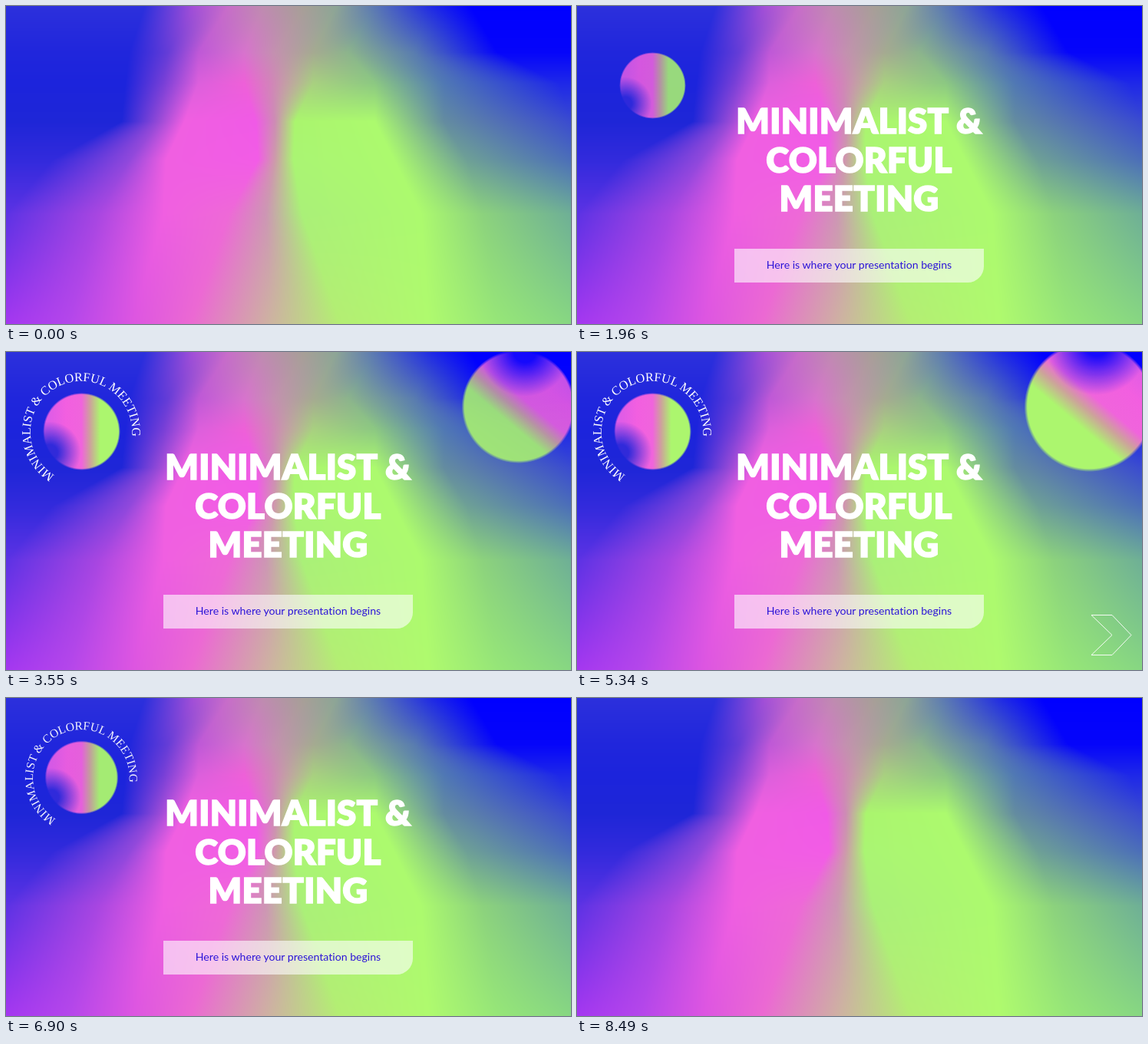
An HTML page with a canvas that plays this animation: 736 by 414 pixels, repeating every 9500 ms.

```html
<!DOCTYPE html>
<html lang="en">
<head>
<meta charset="utf-8">
<title>Minimalist &amp; colorful meeting</title>
<style>
  html, body { margin: 0; width: 100%; height: 100%; overflow: hidden; background: #2026dc; }
  canvas, svg { position: absolute; left: 0; top: 0; width: 736px; height: 414px; }
  text { fill: #fff; }
  #title { font: 900 45.5px Lato, sans-serif; letter-spacing: .3px; text-anchor: middle; stroke: #fff; stroke-width: 1.5px; }
  #subtitle { font: 14.1px Lato, sans-serif; font-variant-ligatures: none; text-anchor: middle; fill: #2c14d8; }
  #ring { font: 16.3px "Liberation Serif", serif; }
</style>
</head>
<body>
<canvas id="backdrop" width="736" height="414"></canvas>
<svg viewBox="0 0 736 414">
  <defs>
    <linearGradient id="dye">
      <stop offset=".1" stop-color="#e05ce6"/>
      <stop offset=".3" stop-color="#f25fe0"/>
      <stop offset=".5" stop-color="#f064dc"/>
      <stop offset=".61" stop-color="#cda29b"/>
      <stop offset=".74" stop-color="#acf66e"/>
    </linearGradient>
    <linearGradient id="dyeShifted" href="#dye" gradientTransform="translate(-.08)"/>
    <radialGradient id="softEdge">
      <stop offset=".95" stop-color="#fff"/>
      <stop offset="1" stop-color="#000"/>
    </radialGradient>
    <radialGradient id="hollow">
      <stop offset=".25" stop-color="#000" stop-opacity=".9"/>
      <stop offset="1" stop-color="#000" stop-opacity="0"/>
    </radialGradient>
    <mask id="orbMask" maskUnits="userSpaceOnUse" x="-1" y="-1" width="2" height="2">
      <circle r="1" fill="url(#softEdge)"/>
      <circle cx="-.82" cy=".54" r=".8" fill="url(#hollow)"/>
    </mask>
    <path id="ringPath"/>
  </defs>

  <g id="title">
    <text x="367.5" y="165.5">MINIMALIST &amp;</text>
    <text x="367.5" y="216.5">COLORFUL</text>
    <text x="367.5" y="266.5">MEETING</text>
  </g>
  <path id="box" d="M205 316H530V339A21 21 0 0 1 509 360H205Z" fill="#fff"/>
  <text id="subtitle" x="367.5" y="342">Here is where your presentation begins</text>

  <g id="smallOrb"><circle r="1" transform="scale(50.5)" fill="url(#dye)" mask="url(#orbMask)"/></g>
  <g id="ring"><text><textPath href="#ringPath">MINIMALIST &amp; COLORFUL MEETING</textPath></text></g>
  <g id="bigOrb"><circle r="1" transform="rotate(130) scale(85)" fill="url(#dyeShifted)" mask="url(#orbMask)"/></g>
  <path id="arrow" d="M670 342.5H697L722 368.5L697 394.5H670L697 368.5Z" fill="none" stroke="#fff"/>
</svg>
<script>
const LOOP = 9500;
const $ = id => document.getElementById(id);
const mix = (a, b, k) => a + (b - a) * k;
const span = (t, from, to) => Math.min(1, Math.max(0, (t - from) / (to - from)));

// Colour mesh: every row has the same number of "x colour" stops.
const mesh = [
  [0, "180 2c30dc,245 a550d7,290 c86ec8,335 be8caf,390 a5a096,430 8ca596,480 5a78b4,555 1e28e6,605 0000ff"],
  [60, "160 2026dc,210 643cd7,250 be58d7,310 d773cd,350 c391af,400 a5aa91,445 8cb48c,530 5a7daf,640 0505fa"],
  [100, "155 1c24dc,205 783fd7,250 dc5fdc,310 ee60d8,345 d284b9,400 a8d080,480 8cc882,570 5078b4,720 1e28e8"],
  [150, "150 1e26d7,200 9b4bd7,232 f05fe1,325 f05ae6,350 cd8cb4,376 aaf56e,480 acfa6e,570 648ca0,736 3a4bd0"],
  [200, "60 322adc,160 9048dc,208 f05fe1,328 f25ce6,350 cd9baa,374 aaf573,505 acfa6e,600 6ea096,736 4b6eb9"],
  [270, "0 5c32e4,120 a846e1,205 f05fe1,290 ee69d7,338 cd96b4,385 aaf078,540 acfa6e,620 8cd27d,736 6eaf96"],
  [414, "0 a537f0,80 b446eb,165 dc55e1,240 eb69d2,345 cdb4a0,435 b4ee73,550 affa6e,640 96e678,736 87d782"]
].map(([y, row]) => ({
  y,
  stops: row.split(",").map(stop => {
    const [x, hex] = stop.split(" ");
    const rgb = parseInt(hex, 16);
    return [+x, rgb >> 16, rgb >> 8 & 255, rgb & 255];
  })
}));

function paintBackdrop() {
  const ctx = $("backdrop").getContext("2d");
  const image = ctx.createImageData(736, 414);
  for (let y = 0, p = 0; y < 414; y++) {
    const r = mesh.findIndex(row => row.y > y);
    const above = mesh[r - 1], below = mesh[r];
    const k = (y - above.y) / (below.y - above.y);
    const stops = above.stops.map((stop, i) => stop.map((v, c) => mix(v, below.stops[i][c], k)));
    for (let x = 0, s = 0; x < 736; x++, p += 4) {
      while (s < stops.length - 2 && x > stops[s + 1][0]) s++;
      const a = stops[s], b = stops[s + 1];
      const m = span(x, a[0], b[0]);
      for (let c = 1; c < 4; c++) image.data[p + c - 1] = mix(a[c], b[c], m);
      image.data[p + 3] = 255;
    }
  }
  ctx.putImageData(image, 0, 0);
}

function layRingPath() {
  const radius = 66.2;
  const point = deg => {
    const a = deg * Math.PI / 180;
    return `${radius * Math.cos(a)} ${radius * Math.sin(a)}`;
  };
  $("ringPath").setAttribute("d",
    `M${point(121.5)}A${radius} ${radius} 0 0 1 ${point(270)}A${radius} ${radius} 0 0 1 ${point(380)}`);
}

const fade = (id, alpha) => $(id).setAttribute("opacity", alpha);

function zoom(id, x, y, scale, alpha = scale) {
  $(id).setAttribute("transform", `translate(${x} ${y}) scale(${Math.max(scale, 0.001)})`);
  fade(id, alpha);
}

function draw(t) {
  const headingOut = 1 - span(t, 7940, 8490);
  const boxIn = span(t, 550, 1100);
  fade("title", span(t, 0, 550) * headingOut);
  fade("box", 0.6 * boxIn * (2 - boxIn) * headingOut);
  fade("subtitle", span(t, 800, 1150) * headingOut);

  const smallOut = 1 - span(t, 6850, 7850);
  zoom("smallOrb", 98.5, 103.5, span(t, 1100, 2100) * smallOut);
  zoom("ring", 98, 104, smallOut, span(t, 2100, 2680) * smallOut);

  zoom("bigOrb", 667.5, 71, span(t, 2680, 3680) * (1 - span(t, 5780, 6780)));
  fade("arrow", span(t, 3680, 4250) * (1 - span(t, 5300, 5780)));
}

paintBackdrop();
layRingPath();
const start = performance.now();
(function tick() {
  draw((performance.now() - start) % LOOP);
  requestAnimationFrame(tick);
})();
</script>
</body>
</html>
```
